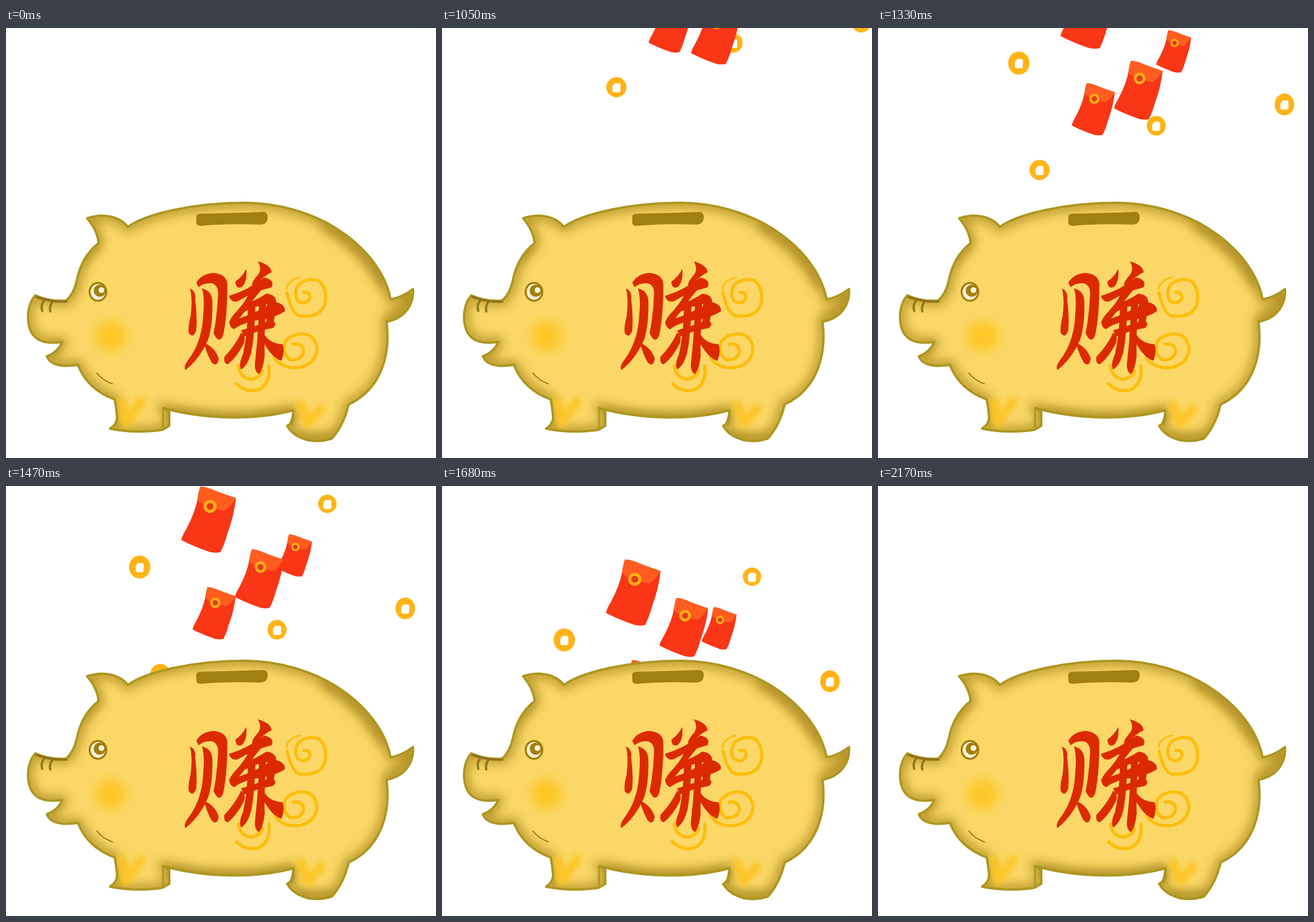
Recreate the animation shown at these times as an HTML page. Size 748 by 748 pixels, loop 2.73 s.

```html
<!DOCTYPE html>
<html lang="zh">
<head>
<meta charset="utf-8">
<title>Piggy bank</title>
<style>
  html, body { margin: 0; width: 100%; height: 100%; overflow: hidden; background: #fff; }
  svg { display: block; width: 100vw; height: 100vh; }
  .line { fill: none; stroke-linecap: round; stroke-linejoin: round; }
</style>
</head>
<body>
<svg viewBox="0 0 748 748">
  <defs>
    <path id="body" d="M141 331C165 323 196 325 212 346C245 322 330 304 415 304C472 304 530 321 572 347C625 380 660 425 669 472Q690 468 708 454C710 480 695 505 662 511C669 565 655 627 596 655Q588 690 567 714Q546 721 525 717Q499 710 489 692Q498 690 500 665C430 684 340 680 273 661L284 667V692L272 699Q225 706 181 697Q195 688 193 674Q192 660 189 646Q142 629 125 586C100 590 78 588 71 571Q90 564 98 546C70 551 46 545 40 518C36 500 39 478 51 465Q78 477 105 474Q118 462 123 440C128 413 141 390 161 374Q159 352 141 331Z"/>
    <clipPath id="inside"><use href="#body"/></clipPath>
    <filter id="soft" x="-50%" y="-50%" width="200%" height="200%"><feGaussianBlur stdDeviation="9"/></filter>
    <filter id="haze" x="-50%" y="-50%" width="200%" height="200%"><feGaussianBlur stdDeviation="5"/></filter>
    <radialGradient id="blush">
      <stop offset="0" stop-color="#fdc61f"/>
      <stop offset=".4" stop-color="#fdc82b" stop-opacity=".85"/>
      <stop offset="1" stop-color="#fad766" stop-opacity="0"/>
    </radialGradient>
    <g id="envelope">
      <path fill="#f93616" d="M0 0Q10 0 28 8Q46 15 62 20Q59 50 47 82Q42 101 35 114Q28 116 17 114Q-10 105 -33 93Q-31 84 -25 75Q-9 45 -5 22Q-3 9 0 0Z"/>
      <path fill="#ff5d20" d="M0 0Q10 0 28 8Q46 15 62 20Q52 36 42 42Q18 38 -2 27L-5 22Q-3 9 0 0Z"/>
      <circle cx="17" cy="34.5" r="8.7" fill="#e63a18" stroke="#ffae17" stroke-width="5.4"/>
    </g>
  </defs>

  <g id="fall"></g>

  <use href="#body" fill="#fad766"/>
  <g clip-path="url(#inside)">
    <use href="#body" class="line" stroke="#a8861c" stroke-width="17" opacity=".8" filter="url(#soft)"/>
    <g class="line" stroke="#a8861c" filter="url(#soft)">
      <path d="M560 345Q620 380 655 440" stroke-width="24" opacity=".65"/>
      <path d="M668 500Q695 490 705 465M130 400L150 380M295 672Q400 688 490 672M510 712H570" stroke-width="16" opacity=".7"/>
    </g>
    <g class="line" stroke="#fdc526" stroke-width="15" filter="url(#haze)">
      <path d="M201 650L208 688L235 649M513 655L525 688L548 662"/>
    </g>
  </g>
  <use href="#body" class="line" stroke="#ad9620" stroke-width="4"/>
  <path d="M273 662V697M500 666Q502 680 497 690" class="line" stroke="#ad9620" stroke-width="3"/>

  <path fill="#a17f10" d="M331 327Q332 323 340 323Q395 322 449 320Q457 322 455 333Q453 342 441 342Q385 340 341 344Q331 345 331 338Z"/>
  <circle cx="182" cy="536" r="47" fill="url(#blush)"/>

  <ellipse cx="160" cy="459" rx="14.5" ry="15.5" fill="#faf0d8" stroke="#a17f10" stroke-width="3.5"/>
  <circle cx="163" cy="457" r="10.5" fill="#a17f10"/>
  <circle cx="166" cy="456" r="5" fill="#fff6df"/>
  <g class="line" stroke="#92751a">
    <path d="M66 475Q60 482 63 492M81 476Q75 484 77 493" stroke-width="4"/>
    <path d="M53 468Q78 477 105 476" stroke-width="4"/>
    <path d="M158 600Q168 613 185 619" stroke-width="2"/>
  </g>

  <g class="line" stroke="#fdbd0c" stroke-width="5.5">
    <path d="M511 434Q490 439 488 455" stroke-width="3"/>
    <path d="M489 461Q497 499 512 501Q546 504 554 482Q561 456 545 440Q526 433 509 446Q500 461 507 474Q522 484 529 469Q529 458 518 460"/>
    <path d="M467 573Q479 592 506 591Q538 587 541 559Q539 535 518 532Q499 531 486 545Q479 565 494 577Q514 579 518 562Q515 547 499 550"/>
    <path d="M404 588Q407 608 426 611Q443 608 446 596M401 619Q416 634 437 630Q461 621 457 588"/>
  </g>

  <g fill="#dc2a00" role="img" aria-label="赚">
    <path d="M320 453Q331 458 329 472Q333 500 331 526Q326 541 318 531Q316 520 321 503Q325 472 320 453Z"/>
    <path d="M331 443Q340 428 360 426Q385 428 385 447Q385 500 378 534Q371 552 361 531Q368 497 369 460Q368 446 357 444Q344 443 335 451Z"/>
    <path d="M341 453Q358 457 359 475Q360 515 352 541Q337 576 312 595Q308 589 318 576Q341 545 343 500Q346 470 341 453Z"/>
    <path d="M344 547Q364 556 370 575Q368 591 358 582Q350 569 344 547Z"/>
    <path d="M438 406Q461 412 462 425Q446 432 430 452Q424 446 436 432Q447 421 438 406Z"/>
    <path d="M418 419Q420 440 411 450Q400 456 399 441Q411 433 418 419Z"/>
    <path d="M388 466Q423 455 449 434Q468 438 462 451Q430 459 404 475Q391 479 388 466Z"/>
    <path d="M427 450L443 457Q425 478 413 496Q400 514 389 513Q388 506 403 491Q421 471 427 450Z"/>
    <path d="M410 483Q435 474 453 462Q470 464 470 477Q469 500 463 522L451 518Q456 500 454 480Q433 484 414 494Z"/>
    <path d="M388 510Q430 500 466 476Q487 480 485 493Q468 504 440 508Q410 513 397 524Q389 522 388 510Z"/>
    <path d="M409 526Q435 518 462 508Q474 514 464 522Q438 526 414 537Z"/>
    <path d="M421 474L434 476Q433 530 427 563Q421 587 409 594Q404 586 412 568Q421 530 421 474Z"/>
    <path d="M440 469L453 472Q449 530 450 570Q447 595 440 602Q432 598 433 584Q440 525 440 469Z"/>
    <path d="M409 530Q419 538 413 550Q402 572 386 585Q378 584 380 572Q399 552 409 530Z"/>
    <path d="M448 531Q458 549 481 550Q486 562 479 579Q463 574 448 547Z"/>
  </g>
</svg>
<script>
const LOOP = 2730, STEP = 70, START = 770, MIDDLE = 1330, END = 2170;
const fall = document.getElementById('fall');

// x and y hold at MIDDLE; rate scales the vertical travel.
const coins = [
  [281, 247, 17.5, 17.5], [245, 61, 18.5, 20], [707, 133, 17, 19],
  [484, 170, 16.5, 17], [571.5, -49, 16, 16]
];
const envelopes = [
  [363, 96, .79, 1], [505, 4, .64, 1], [440, 57, .89, 2 / 3], [350.5, -79, 1, 1]
];

const parts = [];
function add(x, y, rate, markup) {
  fall.insertAdjacentHTML('beforeend', `<g>${markup}</g>`);
  parts.push({ x, y, rate, el: fall.lastChild });
}
for (const [x, y, rx, ry] of coins) add(x, y, 1,
  `<ellipse rx="${rx}" ry="${ry}" fill="#ffb315"/>
   <path fill="#fff" d="M-3-7H4Q7-7 7-4V6Q7 9 4 9H-4Q-7 9-7 6V-2Z"/>`);
for (const [x, y, size, rate] of envelopes) add(x, y, rate,
  `<use href="#envelope" transform="scale(${size})"/>`);

// Speeds up gently, then brakes; u counts steps from MIDDLE.
function drop(u) {
  return u <= 5
    ? u * (38.86 + .619 * u - .024 * u * u)
    : 371 - 164 * ((11.5 - u) / 6.5) ** 1.7;
}

const began = performance.now();
function draw() {
  const t = Math.floor((performance.now() - began) % LOOP / STEP) * STEP;
  const visible = t >= START && t < END;
  fall.style.display = visible ? '' : 'none';
  if (visible) {
    const d = drop((t - MIDDLE) / STEP);
    for (const { x, y, rate, el } of parts)
      el.setAttribute('transform', `translate(${x - .156 * d} ${y + rate * d})`);
  }
  requestAnimationFrame(draw);
}
draw();
</script>
</body>
</html>
```
